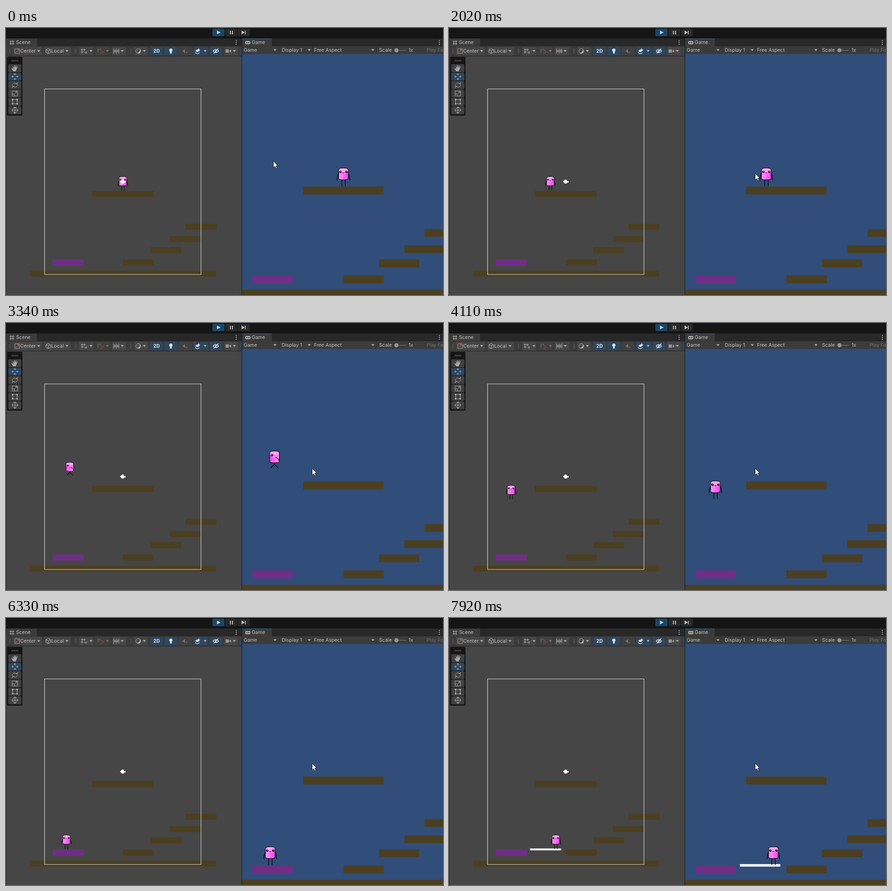
An HTML page with a canvas for the animation above (7990 ms loop, 957x585 px).

```html
<!DOCTYPE html>
<html lang="en">
<head>
<meta charset="utf-8">
<title>Platformer in the editor</title>
<style>
html, body { margin: 0; width: 100%; height: 100%; overflow: hidden; background: #191919; }
#stage { position: relative; width: 957px; height: 585px; overflow: hidden; }
canvas { position: absolute; left: 0; top: 0; }
span { position: absolute; font: 10.7px/16px Inter, Roboto, sans-serif; color: #c2c2c2; white-space: pre; }
</style>
</head>
<body>
<div id="stage"><canvas id="view" width="957" height="585"></canvas></div>
<script>
const W = 957, H = 585, LOOP = 7990, ZOOM = 1.2963;
const stage = document.getElementById('stage');
const view = document.getElementById('view').getContext('2d');
const BLUE = '#2d4760', GREY = '#464646', ICON = '#b4b4b4', DIM = '#777';

// Keys are [time, value, ease into this key]
const ease = {
  lin: u => u,
  out: u => 1 - (1 - u) * (1 - u),
  in: u => u * u,
  both: u => u * u * (3 - 2 * u)
};
function track(keys, t) {
  if (t <= keys[0][0]) return keys[0][1];
  for (let i = 1; i < keys.length; i++) {
    const [t1, v1, e] = keys[i], [t0, v0] = keys[i - 1];
    if (t <= t1) return v0 + (v1 - v0) * ease[e || 'lin']((t - t0) / (t1 - t0));
  }
  return keys[keys.length - 1][1];
}
const heroX = [[1300, 256], [1720, 222], [2320, 222], [3490, 127.5], [3540, 125], [3640, 125],
  [3780, 136], [4780, 136], [4870, 129], [6290, 129], [7590, 234]];
const heroY = [[1165, 356.4], [1500, 327.5, 'out'], [1820, 356.4, 'in'], [2130, 356.4],
  [2440, 329, 'out'], [2700, 349, 'in'], [3060, 330.5, 'out'], [3480, 343, 'in'],
  [4110, 386.5], [4320, 401], [5150, 489], [5290, 506.3]];
const mouseX = [[260, 585], [600, 670, 'both']];
const mouseY = [[260, 291], [600, 318, 'both']];

function rect(c, x, y, w, h, fill) {
  c.fillStyle = fill;
  c.fillRect(x, y, w, h);
}
function button(c, x, y, w, h, fill) {
  c.fillStyle = fill;
  c.beginPath();
  c.roundRect(x, y, w, h, 2);
  c.fill();
}
function stroke(c, d, color = ICON, width = 1) {
  c.strokeStyle = color;
  c.lineWidth = width;
  c.stroke(new Path2D(d));
}
function shape(c, d, color = ICON) {
  c.fillStyle = color;
  c.fill(new Path2D(d));
}
function disc(c, x, y, r, color) {
  c.fillStyle = color;
  c.beginPath();
  c.arc(x, y, r, 0, 7);
  c.fill();
}
function arrow(c, x, y, color = ICON) {
  shape(c, `M${x - 3.5} ${y - 2}h7l-3.5 4z`, color);
}
function kebab(c, x, y) {
  for (const d of [-4, 0, 4]) rect(c, x - 1, y + d - 1, 2, 2, ICON);
}
function label(x, y, text, color, weight) {
  const s = document.createElement('span');
  s.textContent = text;
  s.style.left = x + 'px';
  s.style.top = y - 8 + 'px';
  if (color) s.style.color = color;
  if (weight) s.style.fontWeight = weight;
  stage.append(s);
}

function drawTools(c) {
  button(c, 2, 63, 34, 129, '#161616');
  stroke(c, 'M12 70.5h15M12 72.5h15', '#555');
  for (let i = 0; i < 6; i++) {
    button(c, 5, 79.5 + i * 18.4, 28.5, 17.4, i === 1 ? BLUE : '#404040');
  }
  shape(c, 'M16 95l-4-6 1-1 3 2-1-6h1l2 4v-6h1.4l.6 5 1.6-5 1.2.5-.8 5.5 2.4-4 1 .6-2.4 6.4-2 4z', '#a9a9a9');
  stroke(c, 'M13 106.5h4M22 106.5h4M19.5 100v4M19.5 109v4M15 104l-2.5 2.5 2.5 2.5M24 104l2.5 2.5-2.5 2.5M17 102l2.5-2.5 2.5 2.5M17 111l2.5 2.5 2.5-2.5');
  stroke(c, 'M14 127c-1-5 5-9 9-5l2-1M25 123c1 5-5 9-9 5l-2 1M25 118v4h-4M14 132v-4h4', '#a9a9a9');
  stroke(c, 'M13.5 138v11h12v-11zM13.5 144.5h5v4M20 143l4-4M21 139.5h3v3', '#a9a9a9');
  stroke(c, 'M14.5 157v9h10v-9z', '#a9a9a9');
  for (const x of [13, 23]) for (const y of [155.5, 164.5]) rect(c, x, y, 3, 3, '#b9b9b9');
  stroke(c, 'M14 180a5.5 5.5 0 1 0 11 0a5.5 5.5 0 1 0-11 0M12 180h15M19.5 173v14M17 175l2.5-2.5 2.5 2.5M17 185l2.5 2.5 2.5-2.5', '#a9a9a9');
}

function drawSceneBar(c) {
  for (const x of [8, 152, 273]) stroke(c, `M${x - .5} 45v11M${x + 1.5} 45v11`, '#555');
  for (const [x, w, fill] of [[15, 64, GREY], [84, 58, GREY], [160, 31, GREY], [196, 31, '#404040'],
    [232, 31, GREY], [281, 30, GREY], [316, 27, BLUE], [347, 28, BLUE], [378, 28, '#404040'],
    [410, 19, BLUE], [430, 12, BLUE], [446, 27, BLUE], [478, 30, GREY], [512, 4, BLUE]]) {
    button(c, x, 41.5, w, 18.5, fill);
  }
  for (const x of [71.5, 133.5, 186, 254.5, 303, 436, 500]) arrow(c, x, 50.5);
  arrow(c, 222, 50.5, DIM);
  stroke(c, 'M19.5 45.5h10v10h-10z', '#999');
  stroke(c, 'M21 54l7-7M24 47h4v4', '#b86d50');
  stroke(c, 'M87.5 47.5l5-2.5 5 2.5v6l-5 2.5-5-2.5zM87.5 47.5l5 2.5 5-2.5M92.5 50v6');
  stroke(c, 'M164 47.5h11M164 52.5h6M166.5 45v11M171.5 45v5M172 53l3 3 2-4z');
  stroke(c, 'M200 46.5h9M200 50.5h4M201.5 45v10M206 45v4', '#666');
  stroke(c, 'M207 50h3a2.5 2.5 0 0 1 0 5h-3', '#a55b43');
  stroke(c, 'M235.5 45v11M247 45v11M238.5 47v7M241.5 45v11M244.5 47v7M235 50.5h12');
  stroke(c, 'M284.5 50.5a5.2 5.2 0 1 0 10.4 0a5.2 5.2 0 1 0-10.4 0');
  shape(c, 'M286 54c4 1 7-2 7-7 4 4 1 9-3 9z');
  disc(c, 361, 48.5, 3.6, '#e0e0e0');
  rect(c, 359, 51, 4, 5, '#e0e0e0');
  shape(c, 'M387 49h2l3-3v9l-3-3h-2z', DIM);
  stroke(c, 'M393.5 52l3 3M396.500 52l-3 3', DIM);
  shape(c, 'M414 50l5-3 5 3-5 3zM414 53l5 3 5-3v1.500l-5 3-5-3z', '#dcdcdc');
  shape(c, 'M422 44l1.200 2.800 2.800 1.200-2.800 1.200-1.200 2.800-1.200-2.800-2.800-1.200 2.800-1.200z', '#dcdcdc');
  stroke(c, 'M453.500 50.500q6-7 12 0q-6 7-12 0M455 56l10-11', '#dcdcdc', 1.3);
  disc(c, 459.500, 50.500, 2, '#dcdcdc');
  shape(c, 'M481 47h7v7h-7zM489 50l4-3v7l-4-3z', '#999');
}

function drawChrome(c) {
  rect(c, 0, 0, W, 23, '#151515');
  rect(c, 0, 23, W, 17, '#282828');
  rect(c, 0, 40, W, 22, '#3b3b3b');
  rect(c, 1, 23, 67, 17, '#3b3b3b');
  rect(c, 517, 23, 65, 17, '#3b3b3b');
  rect(c, 517, 23, 65, 1.3, '#2c5d87');
  rect(c, 0, 61, 516, 1, '#272727');
  button(c, 452, 1.5, 26.500, 16.500, '#1d4565');
  button(c, 480.500, 1.5, 26, 16.500, '#292929');
  button(c, 508, 1.5, 26, 16.500, '#292929');
  shape(c, 'M462 5.500l8 4.200-8 4.200z', '#b9d9f2');
  rect(c, 490.500, 6, 2, 8, '#c4c4c4');
  rect(c, 495, 6, 2, 8, '#c4c4c4');
  shape(c, 'M516 5.500l7 4.200-7 4.200zM523.500 6h1.500v8h-1.500z', '#c4c4c4');
  stroke(c, 'M8 29.500h10M8 34.500h10M10.500 27v10M15.500 27v10', ICON, 1.2);
  kebab(c, 504, 31.5);
  kebab(c, 949, 31.5);
  button(c, 524, 28.500, 11, 7, '#b8b8b8');
  disc(c, 527.500, 32, 1.6, '#3b3b3b');
  disc(c, 531.800, 32, 1.6, '#3b3b3b');
  drawSceneBar(c);
  for (const x of [589, 664, 803.500]) arrow(c, x, 48.5);
  for (const x of [597, 671, 810]) rect(c, x, 40, 1, 17, '#2c2c2c');
  rect(c, 855, 48, 21, 2, '#5e5e5e');
  disc(c, 855, 48.800, 4.500, '#969696');
  rect(c, 516, 23, 1, H - 23, '#161616');
}

function drawBody(c) {
  const d = 'M-10.500-36Q-10.500-40 0-40Q10.500-40 10.500-36V-17Q10.500-14 0-14Q-10.500-14-10.500-17Z';
  shape(c, d, '#fb7df8');
  c.save();
  c.clip(new Path2D(d));
  rect(c, -11, -40, 22, 8, '#fda2f6');
  rect(c, 0, -27, 6, 14, '#fd5cf8');
  rect(c, 6, -31, 5, 18, '#f54df2');
  rect(c, -11, -30, 4, 17, '#fd94f8');
  c.restore();
  stroke(c, d, '#17060f', 1.2);
}
function drawEye(c, x, y) {
  disc(c, x, y, 2.5, '#0b0508');
  rect(c, x - .3, y - 1.4, 1.4, 1.4, '#fff');
}
function drawHero(c, dir, t) {
  const ink = '#080808';
  if (dir) {
    const s = 8 + Math.sin(t / 75);
    c.scale(dir, 1);
    stroke(c, `M0-14V-11L${-s}-3M0-11L${s}-3`, ink, 1.4);
    drawBody(c);
    drawEye(c, 5.5, -31);
    stroke(c, 'M-2-26Q-9-24-11-17', ink, 1.4);
  } else {
    stroke(c, 'M-3.500-14V0M4-14V0', ink, 1.4);
    stroke(c, 'M-11-28Q-14-22-13.500-13M11-28Q14-22 13.500-13', ink, 1.5);
    drawBody(c);
    drawEye(c, -6.5, -31.5);
    drawEye(c, 6.5, -31.5);
    stroke(c, 'M-2-30Q0-27.500 2-30', '#40102c', 1.1);
  }
}

// Everything in scene coordinates; the game view shows it enlarged
const blocks = [[188, 357, 135.5], [393, 428.8, 68], [359, 456, 68], [316, 480.2, 68],
  [256, 507.2, 68], [52, 531.5, 408]];
function drawWorld(c, t) {
  for (const [x, y, w] of blocks) rect(c, x, y, w, 13.2, '#4b3f22');
  rect(c, 102, 507.2, 68.5, 13.3, '#6e2f85');
  if (t >= 6750) rect(c, 177.5, 504.9, 68.2, 4.2, '#fff');
  const x = track(heroX, t);
  const dir = Math.sign(Math.round((track(heroX, t - 70) - track(heroX, t - 100)) * 100));
  c.save();
  c.translate(x, track(heroY, t));
  c.scale(1 / ZOOM, 1 / ZOOM);
  drawHero(c, dir, t);
  c.restore();
}

function drawMouse(c, x, y) {
  c.save();
  c.translate(x, y);
  const d = 'M.5.500V15L4 11.800L6.400 17L8.600 16L6.300 11H10.300Z';
  shape(c, d, '#fff');
  stroke(c, d, '#151515', .9);
  c.restore();
}

function pane(c, x, y, w, h, fill, paint) {
  c.save();
  c.beginPath();
  c.rect(x, y, w, h);
  c.clip();
  rect(c, x, y, w, h, fill);
  paint();
  c.restore();
}

const chrome = document.createElement('canvas');
chrome.width = W;
chrome.height = H;
drawChrome(chrome.getContext('2d'));

function render(t) {
  const c = view;
  c.drawImage(chrome, 0, 0);
  pane(c, 0, 62, 516, 523, '#464646', () => {
    rect(c, 0, 62, 1, 523, '#242424');
    drawWorld(c, t);
    stroke(c, 'M84.500 133.500H427V540H84.500Z', '#dedede', 1.1);
    shape(c, 'M250 336.500q0-2 2.500-2q0-3 3-2.500q3 0 2.500 3l4 .5v3l-3 0q0 2.500-3.500 2.500q-3 0-3-2.500q-2.500 0-2.500-2z', '#fff');
    drawTools(c);
  });
  pane(c, 517, 57, 440, 528, '#314d79', () => {
    c.translate(739, 347.5);
    c.scale(ZOOM, ZOOM);
    c.translate(-256, -357);
    drawWorld(c, t);
  });
  drawMouse(c, track(mouseX, t), track(mouseY, t));
}

label(22, 32, 'Scene');
label(538, 32, 'Game');
label(31, 50.5, 'Center');
label(99, 50.5, 'Local');
label(322.5, 50.5, '2D', '#e4e4e4', 700);
label(520.5, 48.5, 'Game');
label(604, 48.5, 'Display 1');
label(674.5, 48.5, 'Free Aspect');
label(817, 48.5, 'Scale');
label(881.5, 48.5, '1x');
label(921, 48.5, 'Play Focused', '#707070');

const start = performance.now();
function frame() {
  render((performance.now() - start) % LOOP);
  requestAnimationFrame(frame);
}
frame();
</script>
</body>
</html>
```
